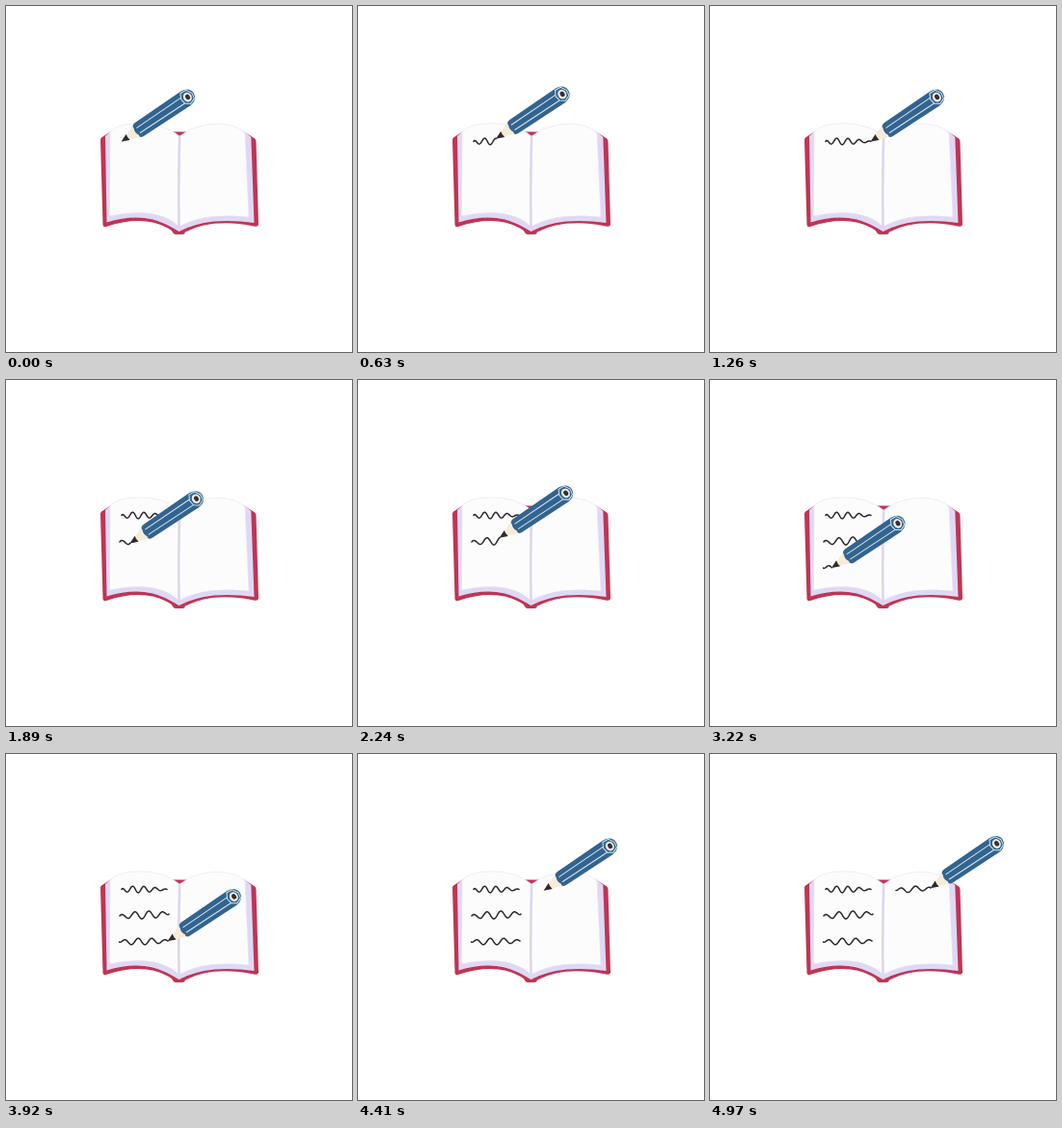
An HTML page that plays this animation: 359 by 359 pixels, repeating every 5040 ms.

```html
<!DOCTYPE html>
<html lang="en">
<head>
<meta charset="utf-8">
<title>Writing in a book</title>
<style>
  html, body { margin: 0; width: 100%; height: 100%; overflow: hidden; background: #fff; }
  svg { display: block; width: 100vw; height: 100vh; }
  .ink { fill: none; stroke: #29262c; stroke-width: 1.5; stroke-linecap: round; stroke-linejoin: round; }
  .blue { fill: #32648f; }
  .stripe { fill: none; stroke: #d5e6ef; stroke-linecap: round; }
</style>
</head>
<body>
<svg viewBox="0 0 359 359">
  <!-- cover -->
  <path fill="#bf3553" d="M109 130 L99 136.500 Q97.600 138 98 140 L100.500 227 Q101 230 104 229
    Q142 216.500 168 230.500 Q172 232.500 173 235 Q174 237 176 237 H183 Q185.500 237 186 234.500
    Q214 220 257 228.500 Q262 229.500 262 226 L259.500 141 Q259.500 138 257.500 137 L248 131 Z"/>
  <!-- page edges -->
  <path fill="#dfd8f5" d="M109 129.500 L103 135 L104.500 224.500 Q140 213.500 166 226.500 Q173 230 179.500 234
    Q194 226 216 223.500 Q236 222 257.500 225 L254.300 136 L247 129.500 L180 160 Z"/>
  <!-- pages -->
  <g fill="#fdfcfd" stroke="#e6e1ee" stroke-width=".6">
    <path d="M108 131.500 Q113 122.500 136 121.800 Q164 121.500 180 135 L179.500 229 Q166 215.500 141 214.500 Q124 214 107.500 218 Z"/>
    <path d="M180 135 Q197 122.500 220 122.200 Q241 123.500 248 132 L252 219 Q232 217 214 218.500 Q193 221 179.500 229 Z"/>
  </g>
  <path d="M180.200 135 Q178.700 180 179.500 231" fill="none" stroke="#dcd5f3" stroke-width="2.600"/>
  <g id="lines"></g>
  <!-- pencil: tip at the origin, body along the x axis -->
  <g id="pencil">
    <path fill="#f6ecd8" d="M0 0 L20 -7.500 V7.500 Z"/>
    <path fill="#302a2c" d="M-.5 0 L8 -3.600 Q7 0 8 3.600 Z"/>
    <path class="blue" d="M22 -8.300 L80 -9 Q89.500 -8 90 0 Q89.500 8 80 9 L22 8.300 Q17 8 18.500 4 Q16 0 18 -4 Q17.500 -8 22 -8.300 Z"/>
    <path class="stripe" d="M21 -3 L76 -3.300 M21 3.300 L76 3.800"/>
    <path class="blue stripe" style="fill: #32648f" d="M78.500 -7.500 L85 -7 L88.500 -1 L87.500 5 L81.500 7.500 L76.500 4 L75.500 -2 Z"/>
    <ellipse cx="82.300" rx="4.300" ry="5" fill="#f4eeeb"/>
    <ellipse cx="82.600" rx="2.300" ry="2.900" fill="#3a2d2e"/>
  </g>
</svg>
<script>
const LOOP = 5040, STEP = 70;

// each line is a wave from x, y: a low point at "dip", one swing per "period"
const lines = [
  { from: 0, to: 1260, x: 120, y: 140.5, w: 47, rise: 0, amp: 4.8, fade: .7, dip: 125.5, period: 11.7 },
  { from: 1680, to: 2660, x: 118, y: 168, w: 51, rise: 2, amp: 4, fade: 0, dip: 126.5, period: 14.5 },
  { from: 3070, to: 3920, x: 117.5, y: 195, w: 50.5, rise: 1, amp: 3.8, fade: .2, dip: 130, period: 14.2 },
  { from: 4410, to: 4970, x: 193, y: 141.5, w: 36, rise: 2.5, amp: 3.4, fade: .2, dip: 205.5, period: 15.5 }
];

const pencil = document.getElementById('pencil');
const clamp = v => Math.max(0, Math.min(1, v));
const progress = (line, t) => clamp((t - line.from) / (line.to - line.from));

function pointOn(line, k) {
  const x = line.x + line.w * k;
  const swell = Math.sqrt(Math.max(0, Math.sin(Math.PI * k))) * (1 - line.fade * k);
  const wave = Math.cos(2 * Math.PI * (x - line.dip) / line.period);
  return [x, line.y - line.rise * k + line.amp * swell * wave];
}

function trail(line, k) {
  const n = Math.ceil(line.w * k * 2), pts = [];
  for (let i = 0; n && i <= n; i++) pts.push(pointOn(line, k * i / n));
  return pts.length ? 'M' + pts.join('L') : '';
}

function tipAt(t) {
  const i = lines.findLastIndex(l => t >= l.from);
  const line = lines[i], next = lines[i + 1];
  const tip = pointOn(line, progress(line, t));
  if (t <= line.to || !next) return tip;
  const k = (t - line.to) / (next.from - line.to), goal = pointOn(next, 0);
  return tip.map((v, j) => v + (goal[j] - v) * k);
}

for (const line of lines) {
  line.el = document.createElementNS('http://www.w3.org/2000/svg', 'path');
  line.el.setAttribute('class', 'ink');
  document.getElementById('lines').append(line.el);
}

function draw(t) {
  for (const line of lines) line.el.setAttribute('d', trail(line, progress(line, t)));
  pencil.setAttribute('transform', `translate(${tipAt(t)}) rotate(-33.9)`);
}

const start = performance.now();
function tick(now) {
  const t = Math.max(0, now - start) % LOOP;
  draw(Math.floor(t / STEP) * STEP);
  requestAnimationFrame(tick);
}
draw(0);
requestAnimationFrame(tick);
</script>
</body>
</html>
```
